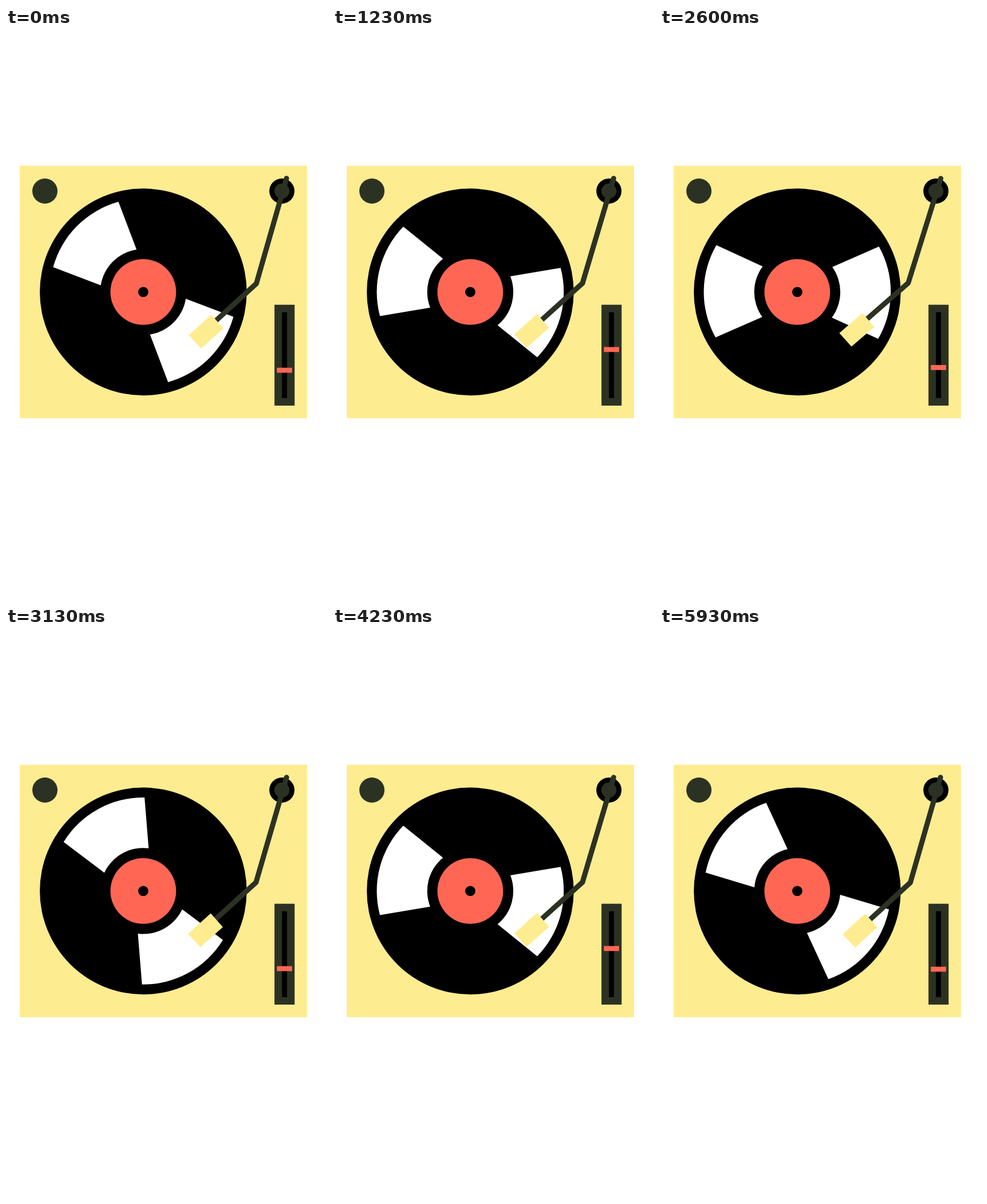
These frames come from a looping animation (561 by 998 pixels, 6010 ms). An HTML page:

```html
<!DOCTYPE html>
<html lang="en">
<head>
<meta charset="utf-8">
<title>Turntable</title>
<style>
  html, body { margin: 0; width: 100%; height: 100%; overflow: hidden; background: #fff; }
  svg { display: block; width: 100%; height: 100%; }
  .yellow { fill: #feec90; }
  .dark { fill: #2c3223; }
  .red { fill: #ff6754; }
  .rod { fill: none; stroke: #2c3223; stroke-width: 9; stroke-linecap: round; stroke-linejoin: round; }
</style>
</head>
<body>
<svg viewBox="0 0 561 998">
  <rect class="yellow" x="24" y="240.8" width="502" height="441.2"/>
  <circle class="dark" cx="68" cy="285" r="22"/>

  <g transform="translate(239.9 461.4)">
    <circle r="180.8"/>
    <path id="shine" fill="#fff"/>
    <circle class="red" r="57.4"/>
    <circle r="8.9"/>
  </g>

  <rect class="dark" x="469.2" y="483.7" width="35.2" height="176.3"/>
  <rect x="482.3" y="496.8" width="8.9" height="150"/>
  <rect id="knob" class="red" x="473.4" y="593.8" width="26.6" height="8.7"/>

  <circle cx="482.2" cy="285" r="22"/>
  <circle class="dark" cx="482.2" cy="285" r="13.2"/>
  <g id="arm">
    <path class="rod" d="M490.2 262.8L437.6 446.6L362 516"/>
    <path class="yellow" d="M358.7 501L380 525L341 560.2L319.3 537Z"/>
  </g>
</svg>
<script>
  const LOOP = 6010;
  const CYCLE = 90;       // ticks in one cycle, 30 per second
  const LAST = CYCLE - 1; // tick on which a full turn is complete

  const shine = document.getElementById('shine');
  const knob = document.getElementById('knob');
  const arm = document.getElementById('arm');

  // [tick, value] pairs
  const KNOB_TRACK = [[0, 0], [40, -36.8], [LAST, 0]];
  const ARM_TRACK = [[0, 0], [22, 2.85], [43, 0], [66, 2.85], [LAST, 0]];

  const smooth = u => u * u * (3 - 2 * u);

  function sample(track, tick) {
    const i = track.findIndex(([end]) => end > tick);
    if (i < 0) return track[track.length - 1][1];
    const [t0, v0] = track[i - 1], [t1, v1] = track[i];
    return v0 + (v1 - v0) * smooth((tick - t0) / (t1 - t0));
  }

  function polar(radius, degrees) {
    const a = degrees * Math.PI / 180;
    return `${(radius * Math.cos(a)).toFixed(2)} ${(radius * Math.sin(a)).toFixed(2)}`;
  }

  function wedge(axis) {
    const outer = 163.4, inner = 75.2, outerHalf = 29.6, innerHalf = 36;
    return `M${polar(outer, axis - outerHalf)}` +
      `A${outer} ${outer} 0 0 1 ${polar(outer, axis + outerHalf)}` +
      `L${polar(inner, axis + innerHalf)}` +
      `A${inner} ${inner} 0 0 0 ${polar(inner, axis - innerHalf)}Z`;
  }

  shine.setAttribute('d', wedge(45) + wedge(225));

  // The picture holds for 30 ms, then 70 ms, skipping every third tick.
  function tickAt(ms) {
    const t = Math.min(ms % LOOP, 5999);
    return (Math.floor(t / 100) * 3 + (t % 100 >= 30 ? 1 : 0)) % CYCLE;
  }

  function draw(ms) {
    const tick = tickAt(ms);
    shine.setAttribute('transform', `rotate(${tick * 360 / LAST})`);
    knob.setAttribute('transform', `translate(0 ${sample(KNOB_TRACK, tick)})`);
    arm.setAttribute('transform', `rotate(${sample(ARM_TRACK, tick)} 482.2 285)`);
  }

  let start;
  function loop(now) {
    start ??= now;
    draw(now - start);
    requestAnimationFrame(loop);
  }
  draw(0);
  requestAnimationFrame(loop);
</script>
</body>
</html>
```
